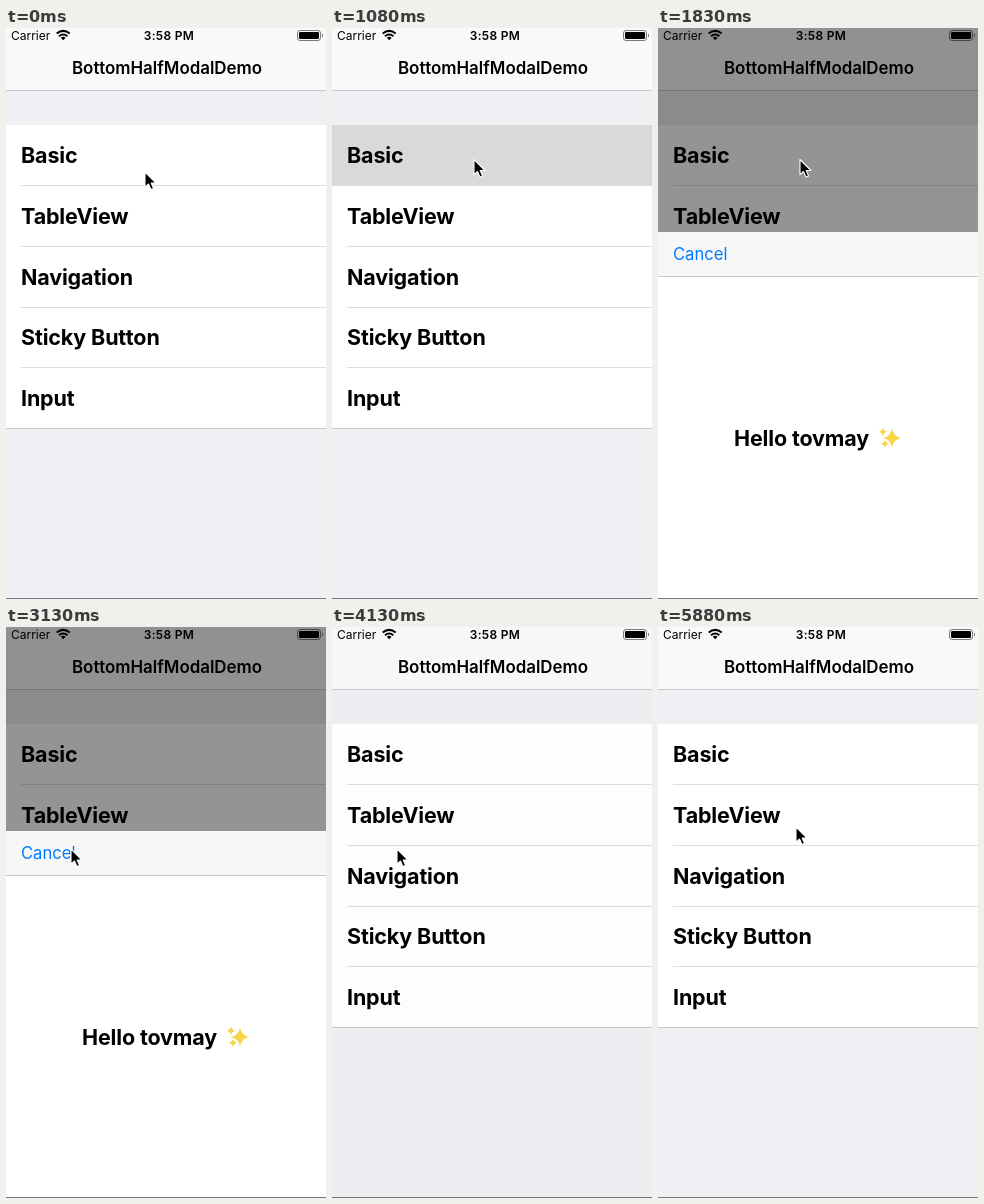
Animation of 320x571 px, one loop 5930 ms. Source, as an HTML page:

```html
<!DOCTYPE html>
<html lang="en">
<head>
<meta charset="utf-8">
<title>Bottom half modal</title>
<style>
  html, body { margin: 0; width: 100%; height: 100%; overflow: hidden; background: #efeff4; }
  svg { display: block; width: 100vw; height: 100vh; }
  text { font-family: Inter, Roboto, sans-serif; }
  .status { font-size: 12px; }
  .title { font-size: 16.9px; font-weight: 600; }
  .row { font-size: 21.5px; font-weight: 700; letter-spacing: -.15px; }
  .action { font-size: 16.6px; fill: #007aff; }
  .hairline { stroke: #c8c7cc; }
</style>
</head>
<body>
<svg viewBox="0 0 320 571" preserveAspectRatio="none">
  <rect width="320" height="571" fill="#efeff4"/>
  <rect y="97" width="320" height="304" fill="#fff"/>
  <rect width="320" height="62" fill="#f9f9f9"/>
  <path class="hairline" d="M0 62.5H320M0 400.5H320"/>
  <g id="lines" class="hairline" stroke-opacity=".6"></g>
  <rect id="highlight" y="97" width="320" height="61" fill="#d9d9d9"/>
  <rect id="dim" width="320" height="571"/>

  <text class="status" x="5" y="11.5">Carrier</text>
  <path d="M50.7 5.6Q57.2 .2 63.7 5.6M53 8.2Q57.2 4.8 61.4 8.2" fill="none" stroke="#000" stroke-width="2"/>
  <path d="M54.8 9.7Q57.2 8 59.6 9.7L57.2 12.3Z"/>
  <text class="status" x="163" y="11.5" text-anchor="middle" font-weight="600" letter-spacing=".3">3:58 PM</text>
  <rect x="291.5" y="2.5" width="23" height="10" rx="2.5" fill="none" stroke="#000" stroke-opacity=".5"/>
  <rect x="293" y="4" width="20" height="7" rx="1.2"/>
  <path d="M316 5.5Q318 7.5 316 9.5Z" fill-opacity=".6"/>
  <text class="title" x="161" y="45.5" text-anchor="middle">BottomHalfModalDemo</text>
  <g id="labels"></g>

  <g id="sheet">
    <rect width="320" height="400" fill="#fff"/>
    <rect width="320" height="44.5" fill="#f7f7f7"/>
    <path class="hairline" d="M0 44.5H320"/>
    <text id="cancel" class="action" x="15" y="28">Cancel</text>
    <text class="row" x="76" y="214">Hello tovmay</text>
    <g fill="#f7d548">
      <path id="star" d="M0 -9.5Q1.4 -1.4 9.5 0Q1.4 1.4 0 9.5Q-1.4 1.4 -9.5 0Q-1.4 -1.4 0 -9.5Z" transform="translate(234 206)"/>
      <use href="#star" transform="translate(115 103) scale(.47)"/>
      <use href="#star" transform="translate(117 115) scale(.47)"/>
    </g>
  </g>
  <path d="M0 570.5H320" stroke="#77777c"/>
  <path id="cursor" d="M0 0V15.2L3.5 12L6 17.6L8.6 16.5L6.2 11H11Z" stroke="#fff" stroke-width="1.1" stroke-linejoin="round"/>
</svg>
<script>
const LOOP = 5930, LIST_TOP = 97, ROW_HEIGHT = 60.7;
const OPEN_Y = 204, CLOSED_Y = 571, DIM = .42;
const PRESS = 950, DISMISS = 3670;

const $ = id => document.getElementById(id);
const set = (id, name, value) => $(id).setAttribute(name, value);
const ease = (t, start, length) => {
  const p = Math.max(0, Math.min(1, (t - start) / length));
  return p * p * (3 - 2 * p);
};

['Basic', 'TableView', 'Navigation', 'Sticky Button', 'Input'].forEach((label, i) => {
  const top = LIST_TOP + i * ROW_HEIGHT;
  if (i) $('lines').innerHTML += `<path d="M15 ${Math.floor(top) + .5}H320"/>`;
  $('labels').innerHTML += `<text class="row" x="15" y="${top + 38.3}">${label}</text>`;
});

function draw(t) {
  const dim = ease(t, 1090, 190) - ease(t, DISMISS, 500);
  const open = ease(t, 1250, 480) - ease(t, DISMISS, 395);
  set('dim', 'opacity', DIM * dim);
  set('highlight', 'opacity', t < PRESS ? 0 : 1 - ease(t, 1300, 400));
  set('sheet', 'transform', `translate(0 ${CLOSED_Y + (OPEN_Y - CLOSED_Y) * open})`);
  set('cancel', 'opacity', t < DISMISS ? 1 : .3);

  // The pointer settles on the first row, goes to Cancel, drifts, then heads back up.
  const settle = ease(t, 40, 300), reach = ease(t, 2380, 370);
  const drift = ease(t, 4500, 350), leave = ease(t, 5540, 340);
  const x = 139 + 3 * settle - 77 * reach + 4.5 * drift + 68.5 * leave;
  const y = 144 - 12.5 * settle + 90.5 * reach - 22 * leave;
  set('cursor', 'transform', `translate(${x} ${y})`);
}

const began = performance.now();
function tick() {
  draw((performance.now() - began) % LOOP);
  requestAnimationFrame(tick);
}
tick();
</script>
</body>
</html>
```
